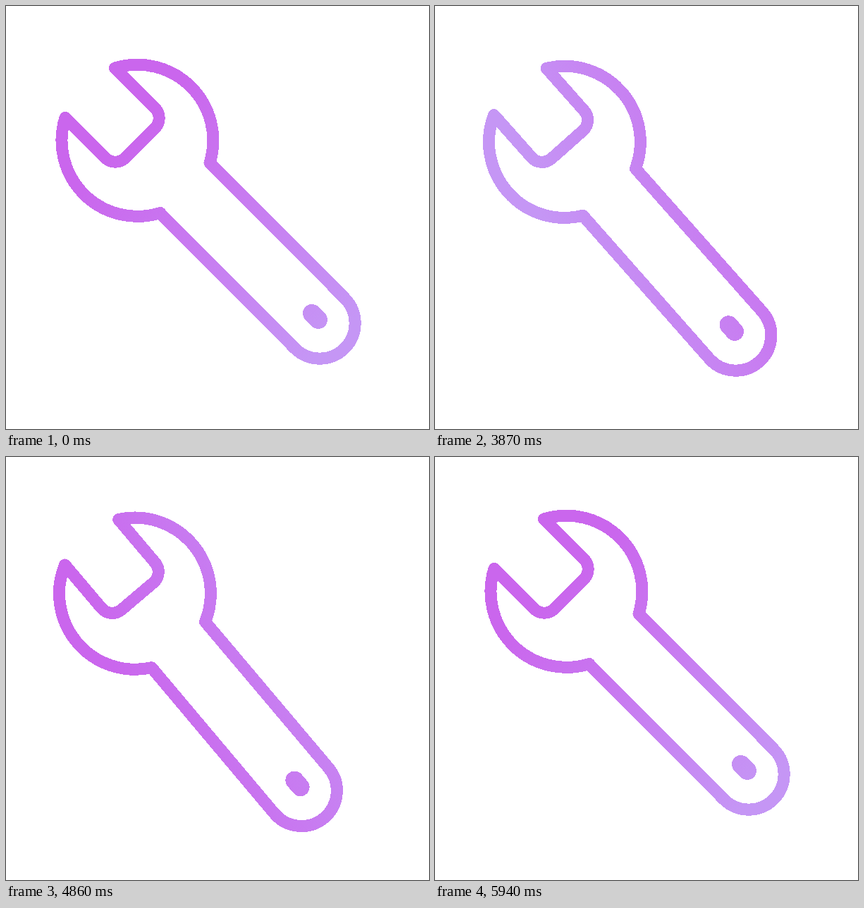
An HTML page for the animation above (5.97 s loop, 600x600 px).

```html
<!DOCTYPE html>
<html lang="en">
<head>
<meta charset="utf-8">
<title>Wrench</title>
<style>
  html, body { margin: 0; width: 100%; height: 100%; overflow: hidden; background: #fff; }
  svg { display: block; width: 100vw; height: 100vh; }
</style>
</head>
<body>
<svg viewBox="0 0 600 600" shape-rendering="crispEdges">
  <defs>
    <linearGradient id="tint" gradientUnits="userSpaceOnUse" x1="-205" y1="0" x2="205" y2="0">
      <stop offset="0" stop-color="#ca66ed"/>
      <stop offset="1" stop-color="#c596f5"/>
    </linearGradient>
  </defs>
  <g id="wrench" fill="none" stroke="url(#tint)" stroke-width="17" stroke-linecap="round" stroke-linejoin="round">
    <path d="M154.5 88 A107.5 107.5 0 0 1 289 222.5 L480.5 414.5 A50.2 50.2 0 0 1 409.5 485.5
             L218.5 293.5 A107.5 107.5 0 0 1 84 158.5 L141 215.5 A20 20 0 0 0 169 215.5
             L211.5 173 A20 20 0 0 0 211.5 145 Z"/>
    <path d="M434 436 L443 445" stroke-width="26"/>
  </g>
</svg>
<script>
  const LOOP = 5970, STEP = 30;
  const wrench = document.getElementById('wrench');
  const tint = document.getElementById('tint');

  // [time in ms, degrees]
  const swing = [[3000, 0], [3210, 22.5], [3700, -10.3], [4080, 22.5], [4420, -10.3],
                 [4725, -10.3], [5010, 22.5], [5410, -10.3], [5940, 0]];
  const spin = [[3000, 45], [3870, 158], [4230, 232], [4860, 338], [5280, 405]];

  const linear = p => p;
  const easeInOut = p => (1 - Math.cos(Math.PI * p)) / 2;

  function valueAt(keys, time, ease) {
    if (time <= keys[0][0]) return keys[0][1];
    const next = keys.findIndex(key => key[0] > time);
    if (next < 0) return keys[keys.length - 1][1];
    const [t0, v0] = keys[next - 1], [t1, v1] = keys[next];
    return v0 + (v1 - v0) * ease((time - t0) / (t1 - t0));
  }

  function draw() {
    const time = Math.floor(performance.now() % LOOP / STEP) * STEP;
    const angle = valueAt(swing, time, easeInOut);
    const light = valueAt(spin, time, linear);
    wrench.setAttribute('transform', `rotate(${angle} 150 150)`);
    // Undo the swing so the gradient turns in stage space.
    tint.setAttribute('gradientTransform',
      `rotate(${-angle} 150 150) translate(365 283) rotate(${light})`);
    requestAnimationFrame(draw);
  }
  draw();
</script>
</body>
</html>
```
